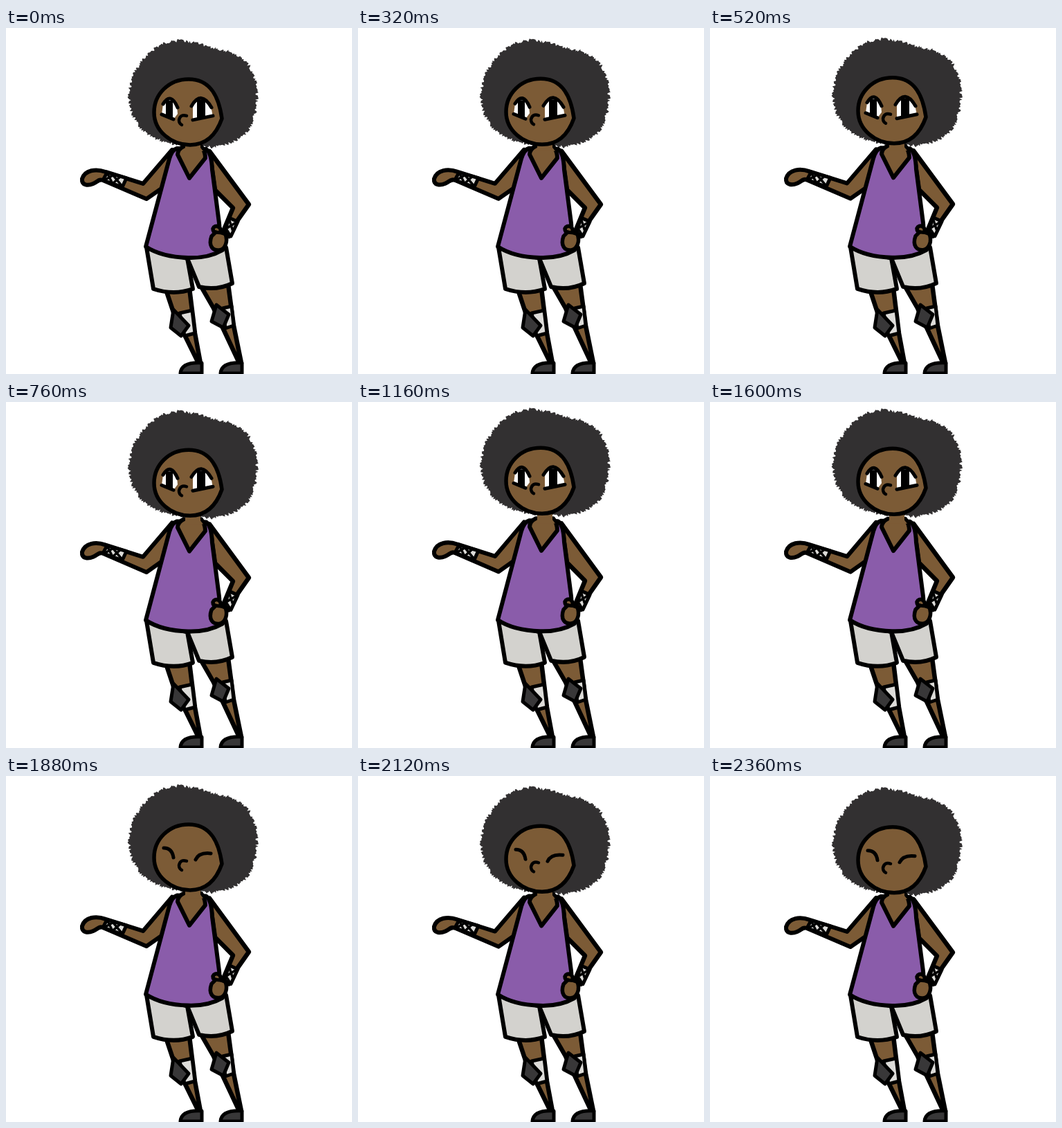
These frames come from a looping animation (500x500 px, 2400 ms). An HTML page with a canvas:

```html
<!DOCTYPE html>
<html lang="en">
<head>
<meta charset="utf-8">
<style>
html, body { margin: 0; width: 100%; height: 100%; overflow: hidden; background: #fff; }
canvas { display: block; width: 500px; height: 500px; }
</style>
</head>
<body>
<canvas id="stage" width="500" height="500"></canvas>
<script>
const ctx = document.getElementById('stage').getContext('2d');
const LOOP = 2400, STEP = 40;
const SKIN = '#7c5b36', HAIR = '#323031', SHIRT = '#8a5caa',
      SHORTS = '#d3d2ce', WRAP = '#dddcd9', PAD = '#383738';

function shape(d, fill, width = 6.5) {
  const path = new Path2D(d);
  if (fill) { ctx.fillStyle = fill; ctx.fill(path); }
  if (width) { ctx.lineWidth = width; ctx.strokeStyle = '#000'; ctx.stroke(path); }
}

const line = (d, width) => shape(d, null, width);

function seeded(seed) {
  return () => (seed = (seed * 16807) % 2147483647) / 2147483647;
}

// Smooth closed outline through a few points, roughened into short tufts.
function makeHair() {
  const pts = [[246, 20], [213, 33], [190, 61], [181, 84], [180, 103], [186, 128],
    [204, 151], [230, 163], [263, 169], [302, 170], [327, 163], [347, 149],
    [357, 127], [361, 101], [359, 77], [347, 52], [326, 37], [304, 32], [277, 24]];
  const random = seeded(71), path = new Path2D(), n = pts.length;
  const spline = (a, b, c, d, u) => 0.5 * (2 * b + (c - a) * u +
    (2 * a - 5 * b + 4 * c - d) * u * u + (3 * b - a - 3 * c + d) * u * u * u);
  for (let i = 0; i < n; i++) {
    const [a, b, c, d] = [-1, 0, 1, 2].map(k => pts[(i + k + n) % n]);
    const count = Math.round(Math.hypot(c[0] - b[0], c[1] - b[1]) / 1.5);
    for (let k = 0; k < count; k++) {
      const x = spline(a[0], b[0], c[0], d[0], k / count);
      const y = spline(a[1], b[1], c[1], d[1], k / count);
      const angle = Math.atan2(y - 96, x - 271);
      const out = random() * 5 - 0.8;
      path.lineTo(x + Math.cos(angle) * out, y + Math.sin(angle) * out);
    }
  }
  path.closePath();
  return path;
}
const hair = makeHair();

function drawLegs() {
  shape('M231 378 L242 411 L278 484 L281 484 L273 441 L265 376Z', SKIN);
  shape('M251 412 L269 408 L273 441 L258 445Z', WRAP, 5);
  shape('M242 407 L264 430 L253 445 L238 433Z', PAD, 5);
  shape('M252 499 C253 487 264 483 283 484 L283 499Z', PAD, 5);
  shape('M281 372 L300 405 L337 484 L340 484 L329 430 L321 370Z', SKIN);
  shape('M313 405 L326 402 L329 430 L317 434Z', WRAP, 5);
  shape('M304 400 L322 414 L314 433 L297 424Z', PAD, 5);
  shape('M310 499 C311 487 322 483 341 484 L341 499Z', PAD, 5);
}

function drawArms() {
  shape('M240 176 L198 225 L144 208 C130 203 114 205 110 218 C109 228 119 228 126 225 ' +
    'C133 222 134 218 140 220 L203 247 L226 231Z', SKIN, 6);
  shape('M146 209 L174 217 L168 230 L140 220Z', WRAP, 5);
  line('M146 209 L154 225 L165 215 M154 212 L168 229 L174 217 M142 220 L156 212', 3.5);
  shape('M294 178 L351 255 L334 279 L322 301 L313 296 L328 260 L302 234Z', SKIN);
  shape('M322 274 L335 280 L325 301 L316 296Z', WRAP, 5);
  line('M322 275 L328 294 M334 280 L318 290 M318 290 L325 301', 3.5);
}

function drawTorso() {
  shape('M203 317 L213 377 Q243 387 270 377 L262 333Z', SHORTS, 6);
  shape('M262 333 L279 374 Q304 380 327 369 L318 317Z', SHORTS, 6);
  drawArms();
  shape('M247 174 Q240 176 236 189 L202 316 Q225 331 263 332 Q292 333 313 321 ' +
    'Q309 300 308 282 L298 205 Q297 180 289 175Z', SHIRT, 6);
  shape('M257 171 Q248 175 248 183 L265 217 L288 188 Q288 178 282 171Z', SKIN, 6);
  shape('M259 158 H281 V173 L285 178 H253 L259 173Z', SKIN, 0);
  shape('M297 301 C292 315 299 322 308 321 C317 320 321 308 317 298 ' +
    'L310 295 C312 287 302 283 299 290 Q299 295 303 295Z', SKIN, 5.5);
  line('M302 295 L312 296', 5);
}

function drawOpenEyes() {
  shape('M227 110 Q238 96 247 113 L248 124 L242 132 L225 125Z', '#fff', 0);
  shape('M270 113 Q284 93 296 113 L299 128 L270 132Z', '#fff', 0);
  shape('M231 105 H241 V131 L231 128Z', '#000', 0);
  shape('M276 104 H288 V131 L276 133Z', '#000', 0);
  line('M227 110 Q238 92 248 115', 5);
  line('M268 113 Q282 89 297 115', 5);
  line('M225 125 L242 132', 5);
  line('M270 133 L299 127', 5);
}

function drawClosedEyes() {
  line('M228 108 Q240 108 242 122', 5);
  line('M274 125 Q279 114 296 116', 5);
}

function drawFace(closed) {
  shape('M312 131 C308 102 297 74 264 74 C235 74 214 96 214 122 ' +
    'C214 149 239 169 266 169 C292 169 305 151 312 131Z', SKIN, 5.5);
  closed ? drawClosedEyes() : drawOpenEyes();
  line('M261 127 Q252 124 250 133 Q250 138 254 140', 4.5);
}

function draw(t) {
  const lift = (1 - Math.cos((t - 90) / LOOP * 2 * Math.PI)) / 2;
  const stretch = 1 + lift * 0.012;
  const headY = -8 * lift;

  ctx.fillStyle = '#fff';
  ctx.fillRect(0, 0, 500, 500);
  ctx.lineCap = ctx.lineJoin = 'round';

  ctx.save();
  ctx.translate(0, headY);
  ctx.fillStyle = HAIR;
  ctx.fill(hair);
  ctx.restore();

  drawLegs();
  ctx.save();
  ctx.translate(0, 400 * (1 - stretch));
  ctx.scale(1, stretch);
  drawTorso();
  ctx.restore();

  ctx.save();
  ctx.translate(0, headY);
  drawFace(t >= 1800);
  ctx.restore();
}

const start = performance.now();
function tick() {
  const t = (performance.now() - start) % LOOP;
  draw(Math.floor(t / STEP) * STEP);
  requestAnimationFrame(tick);
}
tick();
</script>
</body>
</html>
```
